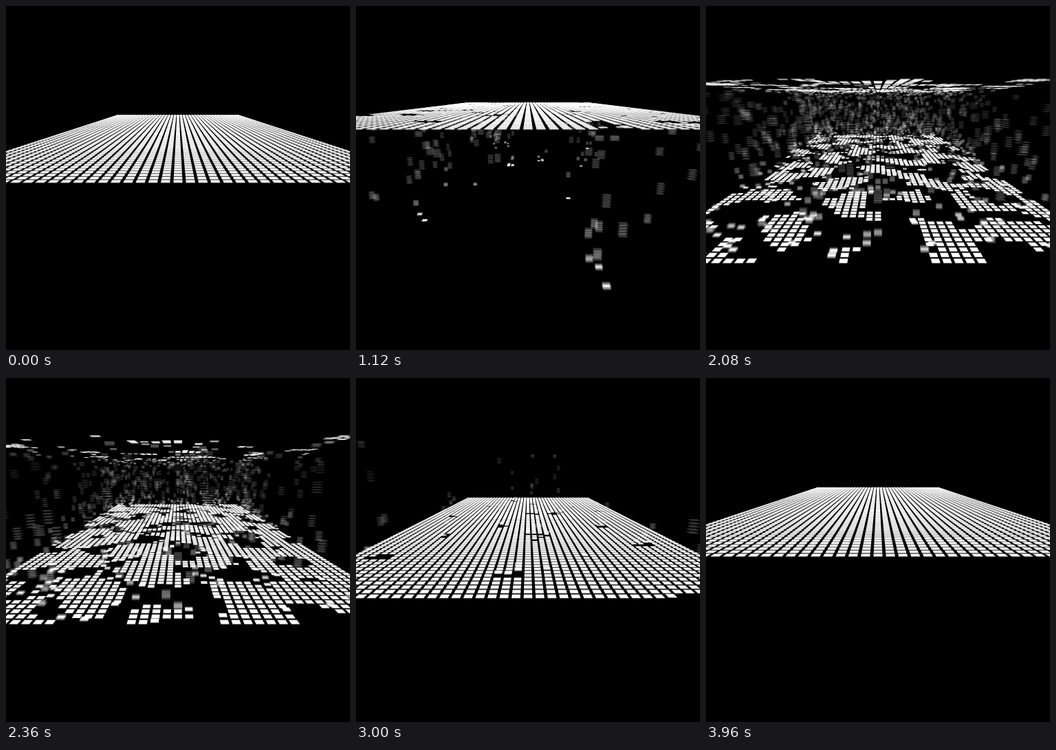
These frames come from a looping animation (500 by 500 pixels, 4 s). An HTML page with a canvas:

```html
<!DOCTYPE html>
<html>
<head>
<meta charset="utf-8">
<title>Falling floor</title>
<style>
  html, body { margin: 0; width: 100%; height: 100%; overflow: hidden; background: #000; }
  canvas { display: block; width: 100vw; height: 100vh; }
</style>
</head>
<body>
<canvas id="stage" width="500" height="500"></canvas>
<script>
const SIZE = 500, LOOP = 4000, STEP = 40;
const SAMPLES = 5, SHUTTER = 24;

// Camera, in units of one grid cell
const FOCAL = 433, HORIZON = 130, TILT = 0.2703;
const SIN = Math.sin(TILT), COS = Math.cos(TILT);
const SIDE = 21, ROWS = 85, NEAR = 22.2;
const EYE = 6.7, DROP = 15;
const HALF_X = 0.36, HALF_Z = 0.33 * COS, PAD = 0.3;

const FALL = 480, MEAN_START = 1750;

const ctx = document.getElementById('stage').getContext('2d');
const layer = document.createElement('canvas');
layer.width = layer.height = SIZE;
const pen = layer.getContext('2d');

function hash(x, y) {
  let h = Math.imul(x + 101, 374761393) ^ Math.imul(y + 57, 668265263);
  h = Math.imul(h ^ (h >>> 13), 1274126177);
  h = Math.imul(h ^ (h >>> 15), 2246822519);
  return ((h ^ (h >>> 16)) >>> 0) / 4294967296;
}

const mix = (a, b, k) => a + (b - a) * k;
const fade = k => k * k * k * (k * (k * 6 - 15) + 10);
const clamp = (v, lo, hi) => Math.min(hi, Math.max(lo, v));
const ease = p => p < 0.5 ? 2 * p * p : 1 - 2 * (1 - p) * (1 - p);

function noise(x, y) {
  const cx = Math.floor(x), cy = Math.floor(y), fx = x - cx, fy = y - cy;
  const corner = (i, j) => {
    const a = hash(cx + i, cy + j) * Math.PI * 2;
    return Math.cos(a) * (fx - i) + Math.sin(a) * (fy - j);
  };
  const u = fade(fx);
  return mix(mix(corner(0, 0), corner(1, 0), u), mix(corner(0, 1), corner(1, 1), u), fade(fy));
}

const tiles = [];
for (let row = ROWS - 1; row >= 0; row--) {
  for (let col = -SIDE; col <= SIDE; col++) {
    const n = noise(col * 0.17 + 9.3, row * 0.17 + 4.6)
            + 0.45 * noise(col * 0.37 + 31.2, row * 0.37 + 17.8);
    const start = MEAN_START + n * 1650 + (hash(col + 900, row + 700) - 0.5) * 120;
    tiles.push({ col, depth: NEAR + row * COS, start: clamp(start, 620, 2880) });
  }
}

function drawTile(tile, t) {
  const fall = ease(clamp((t - tile.start) / FALL, 0, 1));
  const e = EYE + DROP * (fall - t / LOOP);
  const near = tile.depth - HALF_Z + e * SIN;
  const far = tile.depth + HALF_Z + e * SIN;
  const pad = e < 0 ? -PAD : PAD;
  const y1 = HORIZON + FOCAL * e / (COS * near) + pad;
  const y2 = HORIZON + FOCAL * e / (COS * far) - pad;
  const px = (x, d) => SIZE / 2 + FOCAL * x / d;
  const l = tile.col - HALF_X, r = tile.col + HALF_X;
  const l1 = px(l, near), r1 = px(r, near);
  if ((r1 < 0 && px(r, far) < 0) || (l1 > SIZE && px(l, far) > SIZE)) return;
  pen.beginPath();
  pen.moveTo(l1, y1);
  pen.lineTo(r1, y1);
  pen.lineTo(px(r, far), y2);
  pen.lineTo(px(l, far), y2);
  pen.fill();
}

function render(t) {
  ctx.globalCompositeOperation = 'source-over';
  ctx.globalAlpha = 1;
  ctx.fillStyle = '#000';
  ctx.fillRect(0, 0, SIZE, SIZE);
  ctx.globalCompositeOperation = 'lighter';
  ctx.globalAlpha = 1 / SAMPLES;
  pen.fillStyle = '#fff';
  for (let i = 0; i < SAMPLES; i++) {
    pen.clearRect(0, 0, SIZE, SIZE);
    const at = t + SHUTTER * i / SAMPLES;
    for (const tile of tiles) drawTile(tile, at);
    ctx.drawImage(layer, 0, 0);
  }
}

const origin = performance.now();
let shown = -1;
function tick() {
  const elapsed = Math.max(0, performance.now() - origin) % LOOP;
  const t = Math.floor(elapsed / STEP) * STEP;
  if (t !== shown) render(shown = t);
  requestAnimationFrame(tick);
}
tick();
</script>
</body>
</html>
```
